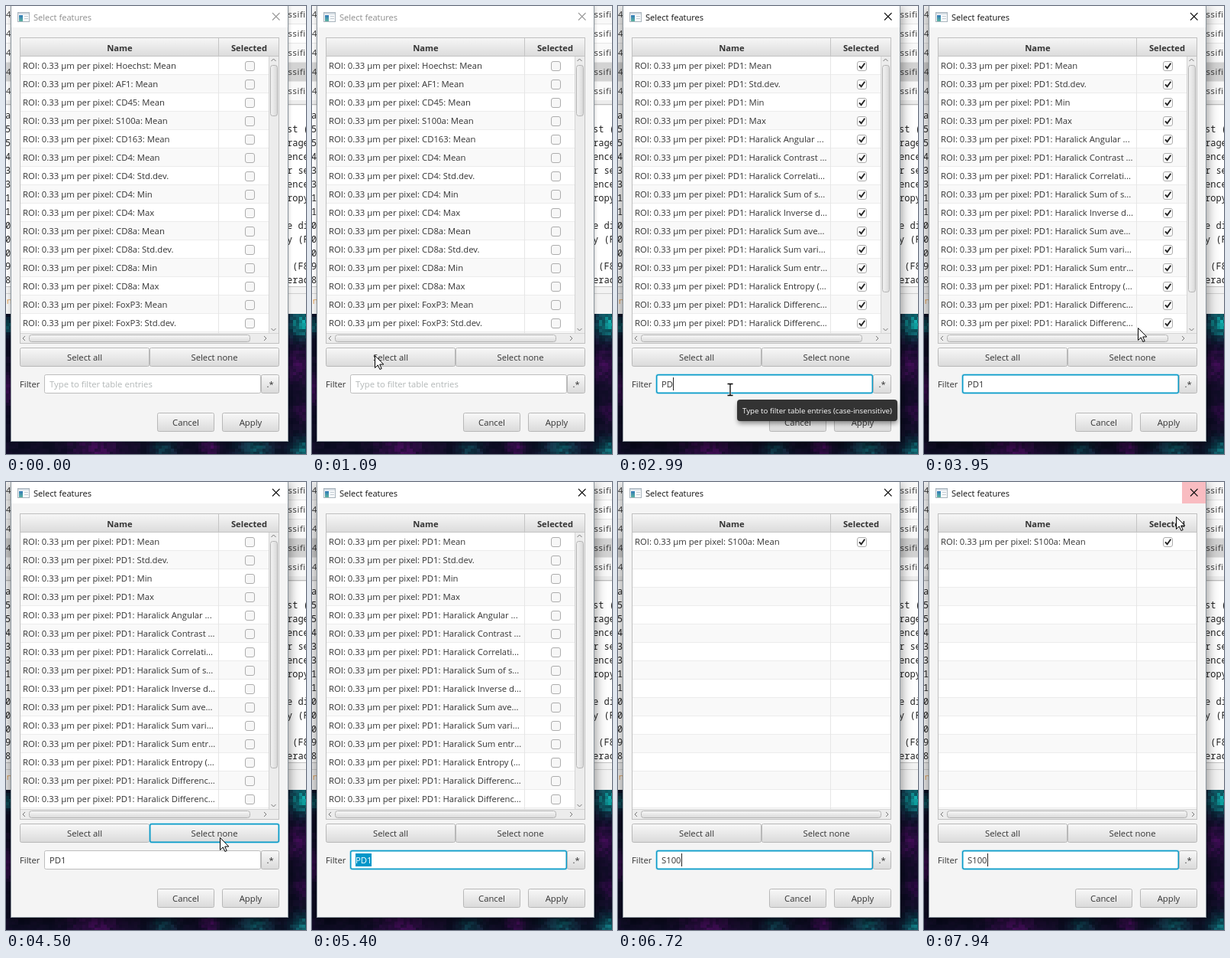
Write an HTML page with a canvas that moves like this. It is 393x585 px and loops after 8000 ms.

```html
<!DOCTYPE html>
<html lang="en">
<head>
<meta charset="utf-8">
<title>Select features</title>
<style>
  html, body { margin: 0; width: 100%; height: 100%; overflow: hidden; background: #fff; }
  #stage { position: relative; width: 393px; height: 585px; overflow: hidden; }
  #stage > * { position: absolute; left: 0; top: 0; }
  #win { left: 6px; top: -1px; width: 362px; height: 568px; border: 1px solid #8b959d; background: #f4f4f4; }
  #win.idle { box-shadow: 0 1px 5px rgba(0, 0, 0, .25); }
  #win.active { box-shadow: 0 5px 15px rgba(0, 0, 0, .5); }
  svg text { font: 11.3px "Open Sans", "Noto Sans", sans-serif; fill: #333; white-space: pre; }
  svg .head { font-weight: 700; font-size: 11.2px; }
  svg .title { font-size: 11.1px; }
  svg .tip { font-size: 9.75px; fill: #fff; }
  svg .mono { font: 12px "Noto Sans Mono", "DejaVu Sans Mono", monospace; fill: #222; }
  svg .mid { text-anchor: middle; }
</style>
</head>
<body>
<div id="stage">
  <canvas id="image" width="393" height="585"></canvas>
  <svg id="back" width="393" height="585"></svg>
  <div id="win"></div>
  <svg id="ui" width="393" height="585"></svg>
</div>
<script>
const LOOP = 8000, STEP = 69, START = 330;
const $ = id => document.getElementById(id);

// ---- small drawing helpers ----
const rect = (x, y, w, h, fill, more = '') =>
  `<rect x="${x}" y="${y}" width="${w}" height="${h}" fill="${fill}" ${more}/>`;
const text = (x, y, s, cls = '', more = '') => `<text x="${x}" y="${y}" class="${cls}" ${more}>${s}</text>`;
const line = (d, stroke, w = 1) => `<path d="${d}" fill="none" stroke="${stroke}" stroke-width="${w}"/>`;
const box = (x, y, w, h, fill, stroke, r = 2) =>
  rect(x + .5, y + .5, w - 1, h - 1, fill, `stroke="${stroke}" rx="${r}"`);
const ring = (x, y, w, h) =>
  rect(x - .5, y - .5, w + 1, h + 1, 'none', 'rx="3" stroke="#8fd3ea" stroke-opacity=".7"') +
  rect(x + .75, y + .75, w - 1.5, h - 1.5, 'none', 'rx="2" stroke="#0a9bc8" stroke-width="1.5"');

const gradient = (id, a, b, flat) =>
  `<linearGradient id="${id}" ${flat ? '' : 'x2="0" y2="1"'}><stop stop-color="${a}"/><stop offset="1" stop-color="${b}"/></linearGradient>`;
const DEFS = `<defs>${gradient('btn', '#f8f8f8', '#dadada')}${gradient('hdr', '#f6f6f6', '#dcdcdc')}` +
  `${gradient('thumbV', '#f4f4f4', '#d8d8d8', true)}${gradient('icon', '#2f78b8', '#5cb3a0')}` +
  `<filter id="soft" x="-10%" y="-40%" width="120%" height="200%"><feGaussianBlur stdDeviation="3"/></filter></defs>`;

// ---- behind the dialog ----
function hash(x, y, k) {
  const n = Math.sin(x * 127.1 + y * 311.7 + k * 74.7) * 43758.5453;
  return n - Math.floor(n);
}

function drawImage() {
  const c = $('image').getContext('2d');
  // x, y, radius, strength, kind (1 teal, 0 purple)
  const blobs = [[387, 413, 17, 1, 1], [386, 578, 14, .7, 1], [1, 416, 9, .6, 1], [325, 580, 22, .45, 1],
    [115, 578, 32, .6, 0], [382, 468, 22, .55, 0], [264, 576, 11, .7, 0], [2, 500, 20, .5, 0], [388, 528, 12, .5, 0],
    [205, 580, 15, .35, 1]];
  for (let y = 402; y < 585; y += 4) for (let x = 0; x < 393; x += 4) {
    let teal = 0, purple = 0;
    for (const [bx, by, r, s, kind] of blobs) {
      const v = s * Math.exp(-((x - bx) ** 2 + (y - by) ** 2) / (r * r));
      if (kind) teal += v; else purple += v;
    }
    const n = .55 + .6 * hash(x, y, 1), m = hash(x >> 3, y >> 3, 2) * .35;
    teal *= n; purple = (purple + m * .5) * n;
    c.fillStyle = `rgb(${8 + 75 * purple},${10 + 150 * teal + 12 * m},${30 + 125 * teal + 75 * purple})`;
    c.fillRect(x, y, 4, 4);
  }
}

function drawBack() {
  let s = rect(0, 0, 393, 402, '#fff');
  for (let i = 0; i < 5; i++) {
    const y = 25 * i - 1;
    s += rect(0, y, 393, 25, i === 3 ? '#d3d3d3' : i % 2 ? '#fff' : '#f9f9f9') + rect(0, y + 24, 393, 1, '#e6e6e6');
    s += text(0, y + 16, '4') + text(369.5, y + 16, 'ssifie', '', 'letter-spacing=".6"');
  }
  s += rect(0, 123, 393, 7, '#ededed') + rect(0, 128, 393, 1, '#bdbdbd');
  const left = 'a554331100098'.split('');
  const right = ['', 'st (', 'rage', 'ence', 'r se', 'ence', 'ropy', '', 'e di', 'y (F', '', ' (F8', 'erac'];
  left.forEach((ch, i) => {
    const y = 147 + i * 17.95;
    s += text(-1, y, ch, 'mono') + text(368, y, right[i], 'mono');
  });
  s += rect(0, 366, 393, 36, '#f3f3f3') + rect(0, 366, 393, 1, '#c4c4c4') + rect(0, 375, 393, 1, '#d0d0d0');
  s += text(-2, 389, 'in', '', 'style="fill:#e0994a"');
  $('back').innerHTML = s;
}

// ---- table contents; "|" marks where a long name is cut ----
const STATS = ['Mean', 'Std.dev.', 'Min', 'Max'];
const TEXTURE = ['Angular |second moment', 'Contrast |(F1)', 'Correlati|on', 'Sum of s|quares', 'Inverse d|ifference moment',
  'Sum ave|rage', 'Sum vari|ance', 'Sum entr|opy', 'Entropy (|F8)', 'Differenc|e variance', 'Differenc|e entropy',
  'Informati|on measure 1', 'Informati|on measure 2'].map(n => 'Haralick ' + n);
const series = (names, parts) => names.flatMap(n => parts.map(p => `${n}: ${p}`));
const FEATURES = [
  ...series(['Hoechst', 'AF1', 'CD45', 'S100a', 'CD163'], ['Mean']),
  ...series(['CD4', 'CD8a'], STATS),
  ...series(['FoxP3', 'PD1', 'CD68'], [...STATS, ...TEXTURE]),
  ...series(['CK', 'CD3', 'CD20'], STATS),
].map(n => 'ROI: 0.33 µm per pixel: ' + n);
const shorten = n => n.includes('|') ? n.split('|')[0] + '...' : n;

// ---- timeline: [time, value], each value holds until the next ----
const TYPED = [[0, ''], [2720, 'P'], [2990, 'PD'], [3340, 'PD1'], [6060, 'S'], [6260, 'S1'], [6590, 'S10'], [6720, 'S100']];
const FOCUS = [[0, ''], [1230, 'all'], [1930, 'field'], [4360, 'none'], [5190, 'field']];
const CARET = [[0, 0], [2000, 1], [2460, 0], [2720, 1], [3800, 0], [6060, 1], [7200, 0], [7660, 1]];
const CLOSE = [[0, 0], [7590, 1], [7860, .6], [7930, .28]];
const at = (table, t) => table.reduce((v, [time, next]) => t >= time ? next : v, table[0][1]);

// pointer paths: [time, x, y]
const PATHS = [
  [[330, 312, 576], [540, 262, 545], [744, 180, 508], [950, 105, 470], [1089, 82, 456], [1300, 92, 458],
    [1430, 106, 464], [1640, 138, 492], [1779, 147, 501], [1917, 148, 502], [1990, 147, 501], [3530, 147, 501],
    [3670, 178, 480], [3850, 262, 435], [3980, 296, 407], [4100, 296, 432], [4220, 281, 463], [4350, 280, 464],
    [4560, 280, 464], [4700, 250, 482], [4850, 180, 508], [5000, 118, 503], [5110, 86, 495], [5180, 82, 495],
    [5250, 56, 496], [5320, 18, 498], [5395, 18, 498]],
  [[7580, 356, 0], [7720, 350, 14], [7850, 339, 30], [7925, 329, 46], [8000, 329, 46]],
];

function pointerAt(t) {
  const q = START + Math.floor((t - START) / STEP) * STEP;
  for (const p of PATHS) {
    if (t < p[0][0] || t >= p[p.length - 1][0]) continue;
    const time = Math.max(q, p[0][0]);
    const i = Math.max(1, p.findIndex(k => k[0] > time));
    const [a, b] = [p[i - 1], p[i]], f = (time - a[0]) / (b[0] - a[0]);
    return [1, 2].map(j => Math.round(a[j] + (b[j] - a[j]) * f));
  }
  return null;
}

function pointer(t) {
  const pos = pointerAt(t);
  if (!pos) return '';
  const [x, y] = pos;
  const dragging = t >= 5190 && t < 5400;
  const inField = x > 50 && x < 334 && y > 481 && y < 507;
  if (dragging || inField) {
    const beam = `M${x - 3.5} ${y - 7.5}h3l.5 .5l.5 -.5h3M${x} ${y - 7}v14M${x - 3.5} ${y + 7.5}h3l.5 -.5l.5 .5h3`;
    return line(beam, '#fff', 2.6) + line(beam, '#000', 1.3);
  }
  return `<path transform="translate(${x} ${y})" d="M.5 .5V16.5L4.3 12.9L6.9 18.5L9.2 17.5L6.7 12H11.8Z" fill="#fff" stroke="#000"/>`;
}

// ---- dialog parts ----
function titleBar(active, hot) {
  const grey = active ? '#111' : '#8d8d8d', cross = hot > .5 ? '#fff' : active ? '#111' : '#999';
  return rect(7, 0, 362, 28, '#fff') +
    (hot ? rect(338, 0, 31, 28, '#e81123', `fill-opacity="${hot}"`) : '') +
    box(15, 8, 16, 13, '#f6f8fa', '#a9b4bd', 0) + rect(16, 9, 14, 2, '#d3dbe2') + rect(17, 12, 5, 8, 'url(#icon)') +
    rect(24, 13, 5, 1, '#c3ccd3') + rect(24, 16, 5, 1, '#c3ccd3') +
    text(36, 19, 'Select features', 'title', `style="fill:${grey}"`) +
    line('M349 9L358.500 18.500M358.500 9L349 18.500', cross, 1.1);
}

function checkbox(y, on) {
  return box(313, y - 6, 13, 13, on ? '#fbfbfb' : '#f7f7f7', '#adadad', 2.5) +
    (on ? line(`M316 ${y + .3}L318.600 ${y + 3.200}L323.300 ${y - 3.300}`, '#222', 1.9) : '');
}

function table(t, list) {
  const scrolls = list.length > 15, right = scrolls ? 344 : 357;
  let s = rect(18, 41, 340, 400, '#c0c0c0') + rect(19, 42, 338, 398, '#fff');
  s += rect(19, 42, 338, 23, 'url(#hdr)') + rect(19, 65, 338, 1, '#c4c4c4') + rect(278, 42, 1, 23, '#c4c4c4');
  s += text(149, 59, 'Name', 'head mid') + text(318.5, 59, 'Selected', 'head mid');
  for (let i = 0; i < 15; i++) {
    const y = 66 + 24 * i, name = list[i];
    s += rect(19, y, right - 19, 24, i % 2 ? '#f9f9f9' : '#fff') + rect(19, y + 23, right - 19, 1, '#ececec');
    if (!name) continue;
    const on = t >= 1300 && !(t >= 4430 && name.includes('PD1'));
    s += text(22, y + 16, shorten(name)) + checkbox(y + 12, on);
  }
  s += rect(278, 66, 1, 361, '#e6e6e6');
  if (scrolls) {
    const h = Math.round(337 * 15 / list.length);
    s += rect(344, 66, 13, 361, '#ececec') + rect(344, 66, 1, 361, '#d4d4d4') + box(346, 77, 10, h, 'url(#thumbV)', '#b3b3b3', 3);
    s += line('M347.500 72L350.500 69L353.500 72M347.500 421L350.500 424L353.500 421', '#777');
  }
  const end = scrolls ? 320 : 345, tip = scrolls ? 341 : 354;
  s += rect(19, 427, 338, 13, '#ececec') + rect(19, 427, 338, 1, '#d4d4d4');
  s += box(30, 429, end - 30, 10, 'url(#btn)', '#b3b3b3', 3);
  return s + line(`M25 431L22 434L25 437M${tip - 3} 431L${tip} 434L${tip - 3} 437`, '#777');
}

function button(x, y, w, label, focused) {
  return box(x, y, w, 25, 'url(#btn)', '#b8b8b8') + (focused ? ring(x, y, w, 25) : '') +
    text(x + w / 2, y + 17, label, 'mid');
}

const pen = document.createElement('canvas').getContext('2d');
function textWidth(s) {
  pen.font = '11.3px "Open Sans", "Noto Sans", sans-serif';
  return pen.measureText(s).width;
}

function field(t, typed, focus) {
  const marked = t >= 5260 && t < 6060, w = textWidth(typed);
  let s = text(18, 498, 'Filter') + box(50, 481, 284, 25, '#fff', '#bdbdbd') + (focus === 'field' ? ring(50, 481, 284, 25) : '');
  if (marked) s += rect(57, 485, Math.round(w), 17, '#0096c9');
  s += typed ? text(57, 498, typed, '', marked ? 'style="fill:#fff"' : '')
    : text(57, 498, 'Type to filter table entries', '', 'style="fill:#b3b8b8"');
  if (at(CARET, t)) s += rect(57 + Math.round(w), 485, 1, 17, '#222');
  return s + button(334, 481, 24, '.*', false);
}

function tooltip() {
  return rect(157, 518, 209, 27, '#000', 'rx="4" opacity=".45" filter="url(#soft)"') +
    rect(156, 514, 210, 28, '#333', 'rx="4"') +
    text(163, 531.5, 'Type to filter table entries (case-insensitive)', 'tip');
}

let shown = '';
function render(t) {
  const active = t >= 1230, typed = at(TYPED, t), focus = at(FOCUS, t);
  const list = FEATURES.filter(n => n.toLowerCase().includes(typed.toLowerCase()));
  const markup = DEFS + titleBar(active, at(CLOSE, t)) + table(t, list) +
    (focus === 'none' ? button(18, 446, 170, 'Select all') + button(188, 446, 170, 'Select none', true)
      : button(188, 446, 170, 'Select none') + button(18, 446, 170, 'Select all', focus === 'all')) +
    field(t, typed, focus) + button(198, 531, 75, 'Cancel') + button(283, 531, 75, 'Apply') +
    (t >= 2790 && t < 3600 ? tooltip() : '') + pointer(t);
  if (markup === shown) return;
  shown = markup;
  $('win').className = active ? 'active' : 'idle';
  $('ui').innerHTML = markup;
}

drawImage();
drawBack();
const begin = performance.now();
function tick() {
  render((performance.now() - begin) % LOOP);
  requestAnimationFrame(tick);
}
tick();
</script>
</body>
</html>
```
